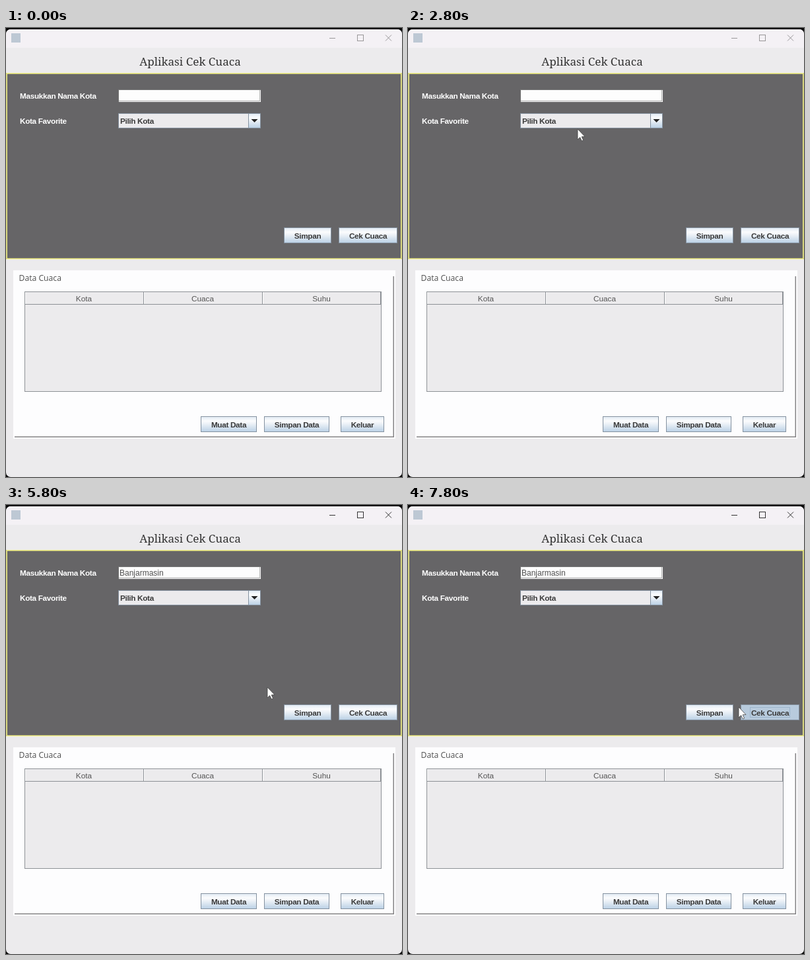
Write an HTML page with a canvas that moves like this. It is 600x680 px and loops after 8 s.

```html
<!DOCTYPE html>
<html lang="id">
<head>
<meta charset="utf-8">
<title>Aplikasi Cek Cuaca</title>
<style>
html, body { margin: 0; width: 100%; height: 100%; overflow: hidden; background: #000; }
canvas { display: block; width: 600px; height: 680px; }
</style>
</head>
<body>
<canvas id="stage" width="600" height="680"></canvas>
<script>
const ctx = document.getElementById('stage').getContext('2d');
const LOOP = 8000, STEP = 200;
const SANS = '"Liberation Sans", Arial, sans-serif';
const BOLD = `bold 11.8px ${SANS}`;
const PAGE = '#ecebed', EDGE = '#8592a0', GRID = '#8d9196', INK = '#3a3a3a';

const CITY = 'Banjarmasin';
const FOCUS = 3400, TYPE = 3800, HOVER = 6400, PRESS = 7000, KEY = 120;

// The pointer rests between moves; each move shifts it by (dx, dy).
const START = { x: 257, y: 153, at: 2800 };
const MOVES = [
  { at: 2800, dur: 400, dx: -8, dy: -47 },
  { at: 5000, dur: 800, dx: 147, dy: 170 },
  { at: 5800, dur: 600, dx: 135, dy: 37 },
  { at: 7400, dur: 400, dx: -30, dy: -7 }
];
const ARROW = new Path2D('M0 0V16L3.7 12.6L6.2 18L8.6 17L6.2 11.7L11 11.5Z');

function pointerAt(t) {
  let { x, y } = START;
  for (const m of MOVES) {
    const k = Math.min(1, Math.max(0, (t - m.at) / m.dur));
    x += m.dx * k;
    y += m.dy * k;
  }
  return { x, y };
}

function typedAt(t) {
  return t < TYPE ? '' : CITY.slice(0, 1 + Math.floor((t - TYPE) / KEY));
}

function caretOn(t, typed) {
  if (t < FOCUS || t >= PRESS) return false;
  const typing = typed && typed !== CITY;
  return typing || Math.floor(t / 500) % 2 === 0;
}

function fill(x, y, w, h, color) {
  ctx.fillStyle = color;
  ctx.fillRect(x, y, w, h);
}

function frame(x, y, w, h, color, width = 1) {
  ctx.strokeStyle = color;
  ctx.lineWidth = width;
  ctx.strokeRect(x + width / 2, y + width / 2, w - width, h - width);
}

function text(str, x, y, font, color, align = 'left') {
  ctx.font = font;
  ctx.letterSpacing = font === BOLD ? '-0.35px' : '0px';
  ctx.fillStyle = color;
  ctx.textAlign = align;
  ctx.fillText(str, x, y);
}

function metal(x, y, w, h) {
  const g = ctx.createLinearGradient(0, y, 0, y + h);
  g.addColorStop(0, '#dfe9f3');
  g.addColorStop(0.3, '#fbfcfd');
  g.addColorStop(0.5, '#eaf0f6');
  g.addColorStop(1, '#b8cfe5');
  fill(x, y, w, h, g);
}

function button(label, x, y, w, state) {
  const h = 24;
  if (state === 'pressed') fill(x, y, w, h, '#b8cbdd');
  else metal(x, y, w, h);
  frame(x, y, w, h, EDGE);
  if (state === 'hover') frame(x + 1, y + 1, w - 2, h - 2, '#b0c6de', 2);
  if (state === 'pressed') {
    ctx.setLineDash([1, 1]);
    frame(x + 14, y + 4, w - 28, 16, '#7f9cb9');
    ctx.setLineDash([]);
  }
  text(label, x + w / 2, y + 17, BOLD, INK, 'center');
}

function titleBar(active) {
  const color = active ? '#333' : '#999799';
  fill(0, 2, 600, 28, '#f4f1f5');
  fill(8, 8, 14, 14, '#bdc8d4');
  fill(490, 15, 9, 1, color);
  frame(532, 10, 10, 10, color);
  ctx.beginPath();
  for (const side of [-1, 1]) {
    ctx.moveTo(579.5 - 4.5 * side, 10.5);
    ctx.lineTo(579.5 + 4.5 * side, 19.5);
  }
  ctx.stroke();
}

function cityField(t) {
  const typed = typedAt(t);
  fill(170, 93, 216, 19, '#fdfdfd');
  fill(170, 93, 216, 1, '#777');
  fill(170, 93, 1, 19, '#777');
  fill(171, 110, 214, 1, '#aaa');
  fill(384, 94, 1, 17, '#aaa');
  text(typed, 172, 107, `12px ${SANS}`, '#505050');
  if (caretOn(t, typed)) {
    fill(172 + Math.round(ctx.measureText(typed).width), 96, 1, 14, '#444');
  }
}

function favourites() {
  fill(170, 129, 216, 23, PAGE);
  metal(367, 129, 19, 23);
  frame(170, 129, 216, 23, EDGE);
  fill(367, 129, 1, 23, EDGE);
  text('Pilih Kota', 173, 145, BOLD, INK);
  ctx.fillStyle = '#222';
  ctx.beginPath();
  ctx.moveTo(371.5, 138);
  ctx.lineTo(381.5, 138);
  ctx.lineTo(376.5, 143);
  ctx.fill();
}

function form(t) {
  fill(0, 68, 600, 282, '#666567');
  frame(0.3, 68, 599.4, 282.3, '#f3f285', 1.6);
  text('Masukkan Nama Kota', 21, 107, BOLD, '#fff');
  text('Kota Favorite', 21, 145, BOLD, '#fff');
  cityField(t);
  favourites();
  button('Simpan', 421, 302, 72);
  button('Cek Cuaca', 504, 302, 89, t >= PRESS ? 'pressed' : t >= HOVER ? 'hover' : '');
}

function table() {
  const x = 28, y = 399, col = 180;
  fill(x, y, 541, 152, PAGE);
  ['Kota', 'Cuaca', 'Suhu'].forEach((name, i) => {
    const left = x + i * col;
    fill(left + 1, y + 1, 1, 18, '#fff');
    fill(left + col - (i === 2 ? 1 : 0), y, 1, 19, GRID);
    text(name, left + col / 2, 414, `11.8px ${SANS}`, '#555', 'center');
  });
  fill(x, y + 19, 541, 1, GRID);
  frame(x, y, 541, 152, GRID);
}

function dataPanel() {
  fill(11, 367, 579, 255, '#fdfdfe');
  fill(586.5, 376, 1.5, 244, '#858386');
  fill(13, 618.5, 575, 1.5, '#858386');
  text('Data Cuaca', 19.5, 382.5, '12.2px "Open Sans", "Noto Sans", sans-serif', '#505050');
  table();
  button('Muat Data', 295, 588, 85);
  button('Simpan Data', 391, 588, 99);
  button('Keluar', 507, 588, 66);
}

function arrow(x, y) {
  ctx.save();
  ctx.translate(x, y);
  ctx.fillStyle = '#fff';
  ctx.fill(ARROW);
  ctx.strokeStyle = '#444';
  ctx.lineWidth = 0.8;
  ctx.stroke(ARROW);
  ctx.restore();
}

function iBeam(x, y) {
  fill(x, y - 6, 1, 14, '#444');
  for (const end of [-7, 7]) fill(x - 3, y + end, 7, 1, '#555');
}

function pointer(t) {
  if (t < START.at) return;
  const { x, y } = pointerAt(t);
  const overField = x > 170 && x < 386 && y > 93 && y < 112;
  (overField ? iBeam : arrow)(x, y);
}

function draw(t) {
  fill(0, 0, 600, 680, '#080808');
  ctx.save();
  ctx.beginPath();
  ctx.roundRect(0, 2, 600, 678, 7);
  ctx.clip();
  fill(0, 2, 600, 678, PAGE);
  titleBar(t >= FOCUS);
  text('Aplikasi Cek Cuaca', 279, 57, '17.1px "Noto Serif", serif', '#333', 'center');
  form(t);
  dataPanel();
  pointer(t);
  ctx.restore();
}

function tick() {
  const t = performance.now() % LOOP;
  draw(Math.floor(t / STEP) * STEP);
  requestAnimationFrame(tick);
}
tick();
</script>
</body>
</html>
```
